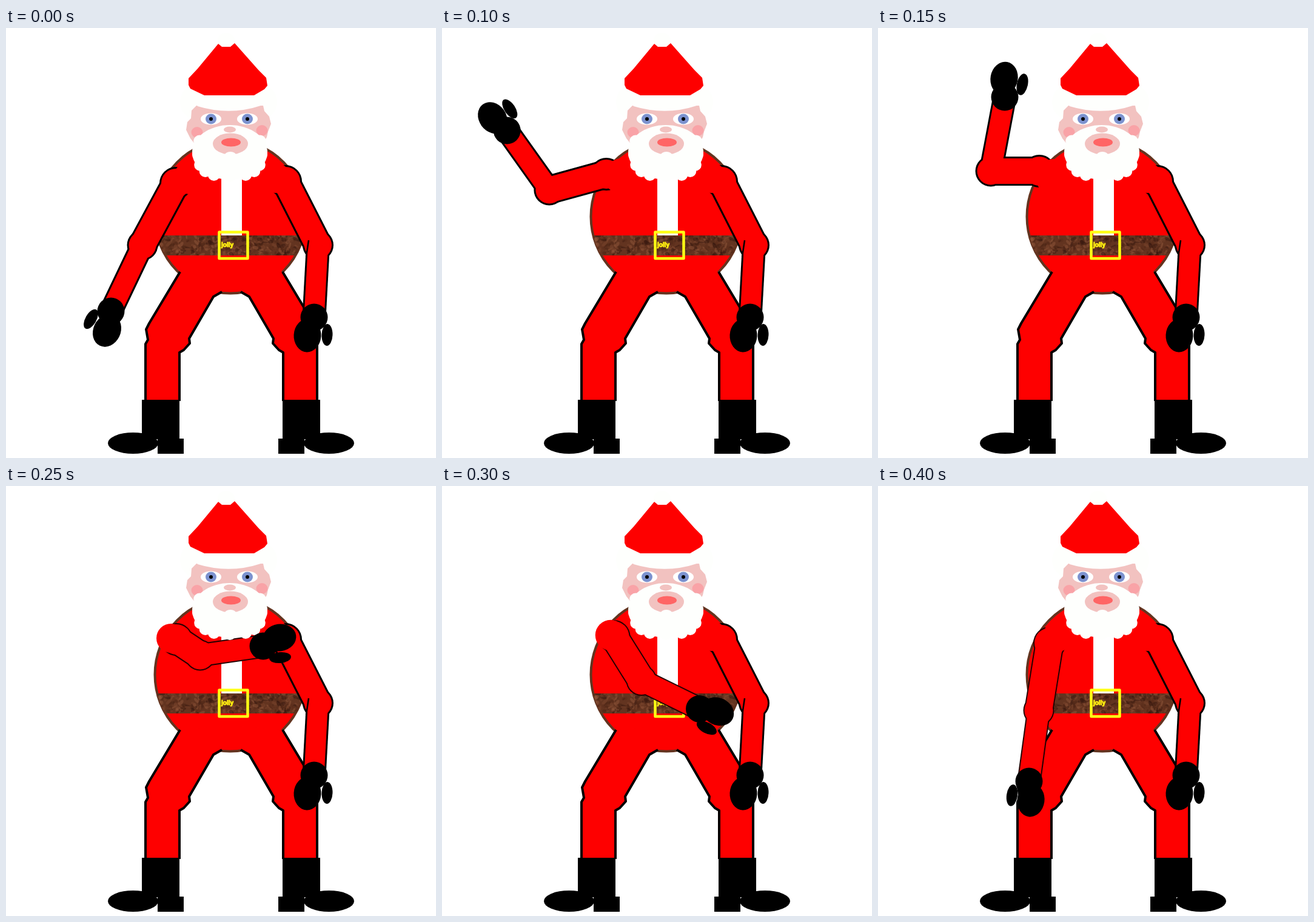
Recreate the animation shown at these times as an HTML page with a canvas. Size 709 by 709 pixels, loop 0.45 s.

```html
<!DOCTYPE html>
<html lang="en">
<head>
<meta charset="utf-8">
<title>Waving Santa</title>
<style>
html, body { margin: 0; width: 100%; height: 100%; overflow: hidden; background: #fff; }
canvas { display: block; }
</style>
</head>
<body>
<canvas id="stage" width="709" height="709"></canvas>
<script>
const ctx = document.getElementById('stage').getContext('2d');
const RED = '#fe0000', BLACK = '#000', SNOW = '#fefffd', SKIN = '#f2c2c0', FUR = '#633420';
const STEP = 50, LOOP = 450;

// Arm poses: joints, glove parts, thumb tilt in degrees, outline, and the
// circle that blends the shoulder into the coat.
const poses = [
  { s: [280, 256], e: [225, 358], w: [173, 467], p: [166.5, 499], t: [140, 480], tilt: -60, line: 3, blend: [303, 247, 27] },
  { s: [276, 246], e: [177, 305], w: [62, 288], p: [30, 291], t: [39, 260], tilt: 10, line: 3, blend: [303, 243, 29] },
  { s: [266, 236], e: [186, 236], w: [209, 114], p: [208, 83], t: [238, 93], tilt: 102, line: 3, blend: [290, 246, 30] },
  { s: [281, 253], e: [320, 279], w: [424, 264], p: [451, 250], t: [452, 283], tilt: 175, line: 2, blend: [272, 251, 24] },
  { s: [286, 243], e: [303, 366], w: [356, 460], p: [378, 481], t: [348, 492], tilt: 240, line: 2, blend: [284, 241, 26.5] },
  { s: [283, 259], e: [265, 370], w: [249, 487], p: [252, 518], t: [221, 510], tilt: 278, line: 2, blend: [299, 246, 26] }
];
const track = [0, 1, 1.5, 2, 2.5, 3, 3.5, 4, 5];

const mix = (a, b, k) => a + (b - a) * k;
const mixAll = (a, b, k) => a.map((v, i) => mix(v, b[i], k));

// Swings a bone from one direction to another along the shorter arc.
function swing(root, a0, a1, b0, b1, k) {
  const ax = a1[0] - a0[0], ay = a1[1] - a0[1];
  const bx = b1[0] - b0[0], by = b1[1] - b0[1];
  const from = Math.atan2(ay, ax);
  let turn = Math.atan2(by, bx) - from;
  turn = Math.atan2(Math.sin(turn), Math.cos(turn));
  const len = mix(Math.hypot(ax, ay), Math.hypot(bx, by), k);
  const dir = from + turn * k;
  return [root[0] + len * Math.cos(dir), root[1] + len * Math.sin(dir)];
}

function poseAt(pos) {
  const a = poses[Math.floor(pos)], k = pos % 1;
  if (!k) return a;
  const b = poses[Math.floor(pos) + 1];
  const s = mixAll(a.s, b.s, k);
  const e = swing(s, a.s, a.e, b.s, b.e, k);
  const w = swing(e, a.e, a.w, b.e, b.w, k);
  return {
    s, e, w,
    p: swing(w, a.w, a.p, b.w, b.p, k),
    t: swing(w, a.w, a.t, b.w, b.t, k),
    tilt: mix(a.tilt, b.tilt, k),
    line: mix(a.line, b.line, k),
    blend: mixAll(a.blend, b.blend, k)
  };
}

function oval(x, y, rx, ry, color, angle = 0) {
  ctx.fillStyle = color;
  ctx.beginPath();
  ctx.ellipse(x, y, rx, ry, angle, 0, Math.PI * 2);
  ctx.fill();
}

const disc = ([x, y], r, color) => oval(x, y, r, r, color);

function box(x, y, w, h, color) {
  ctx.fillStyle = color;
  ctx.fillRect(x, y, w, h);
}

function trace(points) {
  ctx.beginPath();
  points.forEach(([x, y]) => ctx.lineTo(x, y));
}

function poly(points, color) {
  trace(points);
  ctx.fillStyle = color;
  ctx.fill();
}

function polyline(points, width, color = BLACK) {
  trace(points);
  ctx.strokeStyle = color;
  ctx.lineWidth = width;
  ctx.lineJoin = 'round';
  ctx.stroke();
}

// A sleeve is two straight tubes with rounder joints; the outline is the
// same shape drawn first at full size.
function sleeve({ s, e, w, line, blend }) {
  const ink = line < 2.3 ? '#240000' : BLACK;
  for (const [inset, color] of [[0, ink], [line, RED]]) {
    disc(s, 27 - inset, color);
    disc(e, 25.5 - inset, color);
    polyline([s, e], 2 * (24 - inset), color);
    polyline([e, w], 2 * (19.5 - inset), color);
  }
  disc(blend, blend[2], RED);
}

function glove({ e, w, p, t, tilt }) {
  oval(w[0], w[1], 22.5, 22.5, BLACK);
  oval(p[0], p[1], 27.5, 22.5, BLACK, Math.atan2(w[1] - e[1], w[0] - e[0]));
  oval(t[0], t[1], 18, 9, BLACK, tilt * Math.PI / 180);
}

function bodyPath() {
  ctx.beginPath();
  ctx.ellipse(370, 311, 124.5, 126.5, 0, 0, Math.PI * 2);
}

function belt() {
  let seed = 7;
  const rnd = () => (seed = seed * 16807 % 2147483647) / 2147483647;
  const tones = ['#34170e', '#4a2415', '#7a452c', '#8f573a', '#5a2c1a'];
  ctx.save();
  bodyPath();
  ctx.clip();
  ctx.beginPath();
  ctx.rect(240, 342, 260, 33);
  ctx.clip();
  box(240, 342, 260, 33, FUR);
  ctx.globalAlpha = 0.5;
  for (let i = 0; i < 420; i++) {
    const x = 244 + rnd() * 252, y = 342 + rnd() * 33;
    oval(x, y, 1 + rnd() * 5, 1 + rnd() * 2.5, tones[i % 5], rnd() * 3);
  }
  ctx.restore();
}

function buckle() {
  ctx.strokeStyle = '#ffff14';
  ctx.lineWidth = 4.5;
  ctx.strokeRect(351.5, 336.5, 47, 43.5);
  ctx.fillStyle = ctx.strokeStyle = '#ffee10';
  ctx.font = 'bold 10px "Liberation Sans", sans-serif';
  ctx.lineWidth = 1;
  ctx.fillText('jolly', 355, 361);
  ctx.strokeText('jolly', 355, 361);
}

function torso() {
  bodyPath();
  ctx.fillStyle = RED;
  ctx.fill();
  ctx.strokeStyle = FUR;
  ctx.lineWidth = 4;
  ctx.stroke();
  box(355, 240, 34, 102, '#fff');
  belt();
}

function leg(flip) {
  const side = pts => flip ? pts.map(([x, y]) => [743 - x, y]) : pts;
  const outer = side([[287, 402], [236, 487], [231, 497], [234, 514], [230, 521], [230, 615]]);
  const inner = side([[286, 615], [286, 535], [293, 531], [303, 520], [302, 512], [342, 443], [356, 435]]);
  poly([...outer, ...inner, ...side([[372, 395]])], RED);
  polyline(outer, 4);
  polyline(inner, 4);
}

function boot(flip) {
  ctx.save();
  if (flip) {
    ctx.translate(742, 0);
    ctx.scale(-1, 1);
  }
  box(224, 613, 62, 65, BLACK);
  box(250, 677, 43, 25, BLACK);
  oval(209.5, 684.5, 41.5, 17.5, BLACK);
  ctx.restore();
}

function restingArm() {
  const arm = {
    s: [461, 253], e: [514.5, 358], w: [508, 477], p: [497, 507], t: [529.5, 506],
    tilt: 92, line: 3, blend: [444, 247, 25]
  };
  sleeve(arm);
  polyline([[499, 350], [495, 377]], 2.5);
  glove(arm);
}

function eye(x) {
  oval(x, 150, 17, 9.5, '#fff');
  oval(x, 150, 9, 8.5, '#7c92cf');
  oval(x, 150, 3, 3, BLACK);
}

function beard() {
  const bulge = v => Math.sign(v) * Math.abs(v) ** 0.7;
  oval(369, 205, 62, 45, SNOW);
  for (let i = 0; i <= 10; i++) {
    const a = (-20 + i * 22) * Math.PI / 180;
    disc([369 + 52 * bulge(Math.cos(a)), 205 + 39 * bulge(Math.sin(a))], 10, SNOW);
  }
}

function head() {
  oval(367, 122, 80, 45, SNOW);
  oval(363, 20, 14, 12, SNOW);
  poly([[350, 26], [356, 31], [370, 31], [377, 25], [416, 69], [429, 82], [431, 95],
    [426, 101], [409, 111], [327, 111], [304, 100], [301, 94], [301, 83], [316, 67]], RED);

  poly([[314, 128], [306, 136], [305, 149], [299, 155], [297, 168], [304, 182], [312, 192],
    [424, 190], [430, 180], [432, 171], [437, 158], [434, 146], [426, 137], [424, 128]], SKIN);
  ctx.beginPath();
  ctx.moveTo(300, 111);
  ctx.lineTo(436, 111);
  ctx.lineTo(420, 128);
  ctx.quadraticCurveTo(369, 145, 316, 129);
  ctx.fillStyle = SNOW;
  ctx.fill();
  oval(315, 172, 9.5, 9, '#f9a3a7');
  oval(422, 169, 9.5, 9, '#f9a3a7');

  beard();
  eye(338);
  eye(398);
  oval(369, 167.5, 10, 5, SKIN);
  oval(370, 191, 29, 17.5, SKIN);
  oval(370, 211, 10, 7, SNOW);
  oval(371, 188.5, 16, 7, '#ff6565');
}

function draw(step) {
  const pose = poseAt(track[step]);
  box(0, 0, 709, 709, '#fff');
  torso();
  for (const flip of [false, true]) {
    leg(flip);
    boot(flip);
  }
  buckle();
  restingArm();
  sleeve(pose);
  head();
  glove(pose);
}

const start = performance.now();
let shown = -1;
function tick() {
  const step = Math.floor((performance.now() - start) % LOOP / STEP);
  if (step !== shown) draw(shown = step);
  requestAnimationFrame(tick);
}
tick();
</script>
</body>
</html>
```
